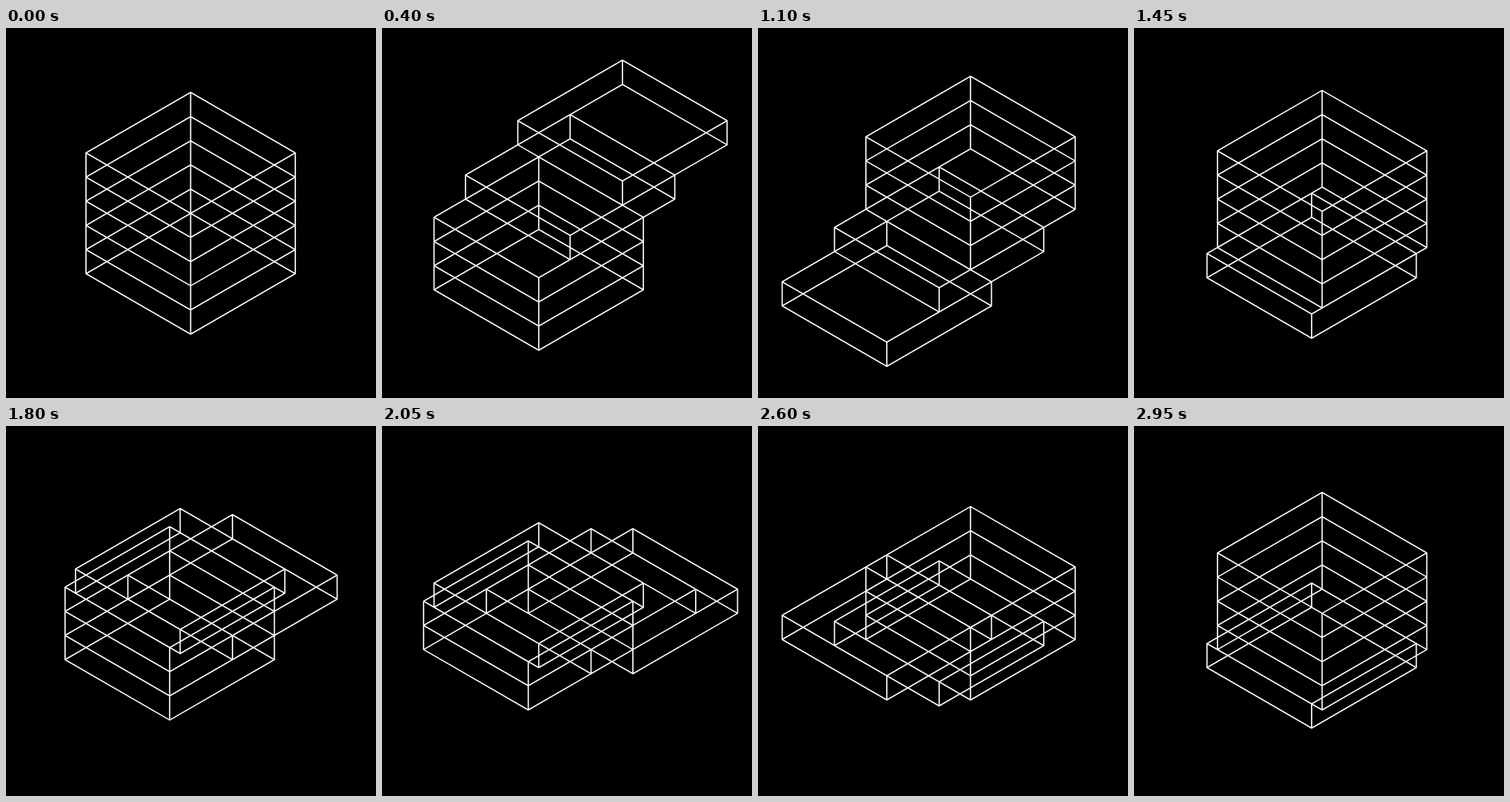
Write an HTML page with a canvas that moves like this. It is 500 by 500 pixels and loops after 3 s.

```html
<!DOCTYPE html>
<html>
<head>
<meta charset="utf-8">
<style>
  html, body { margin: 0; height: 100%; background: #000; overflow: hidden; }
  canvas { display: block; }
</style>
</head>
<body>
<canvas id="stage" width="500" height="500"></canvas>
<script>
const ctx = document.getElementById('stage').getContext('2d');
const CX = 249.5, CY = 250.4;
const SIDE = 163.3, W = SIDE * Math.sqrt(3) / 2, H = SIDE / 2;
const SLABS = 5, THICK = SIDE / SLABS;
const STEP = 50, FRAMES = 60, HALF = FRAMES / 2;

// Gap between slab i and slab i + 1: opens, holds and closes, in tenths of a side.
const gap = (i, k) => Math.max(0, Math.min(5, k - 5 * i, 15 + 5 * i - k));

function slabShifts(k) {
  const pos = [0];
  for (let i = 0; i < SLABS - 1; i++) pos.push(pos[i] - gap(i, k));
  const mean = (pos[0] + pos[2] + pos[4]) / 3;
  return pos.map(p => (p - mean) / 10);
}

function slabPath(x, y) {
  const corners = [[0, -H], [W, 0], [0, H], [-W, 0]];
  for (const dy of [0, THICK]) {
    corners.forEach(([cx, cy], i) => ctx[i ? 'lineTo' : 'moveTo'](x + cx, y + cy + dy));
    ctx.closePath();
  }
  for (const [cx, cy] of corners) {
    ctx.moveTo(x + cx, y + cy);
    ctx.lineTo(x + cx, y + cy + THICK);
  }
}

function draw(now) {
  const frame = Math.floor(now / STEP) % FRAMES;
  const slope = frame < HALF ? -1 : 1; // slide up-right first, then down-right
  ctx.fillStyle = '#000';
  ctx.fillRect(0, 0, 500, 500);
  ctx.strokeStyle = '#fff';
  ctx.lineWidth = 1.7;
  ctx.lineJoin = 'round';
  ctx.beginPath();
  slabShifts(frame % HALF).forEach((s, i) =>
    slabPath(CX + s * W, CY - H + i * THICK + slope * s * H));
  ctx.stroke();
}

function loop(now) {
  draw(now);
  requestAnimationFrame(loop);
}
draw(0);
requestAnimationFrame(loop);
</script>
</body>
</html>
```
